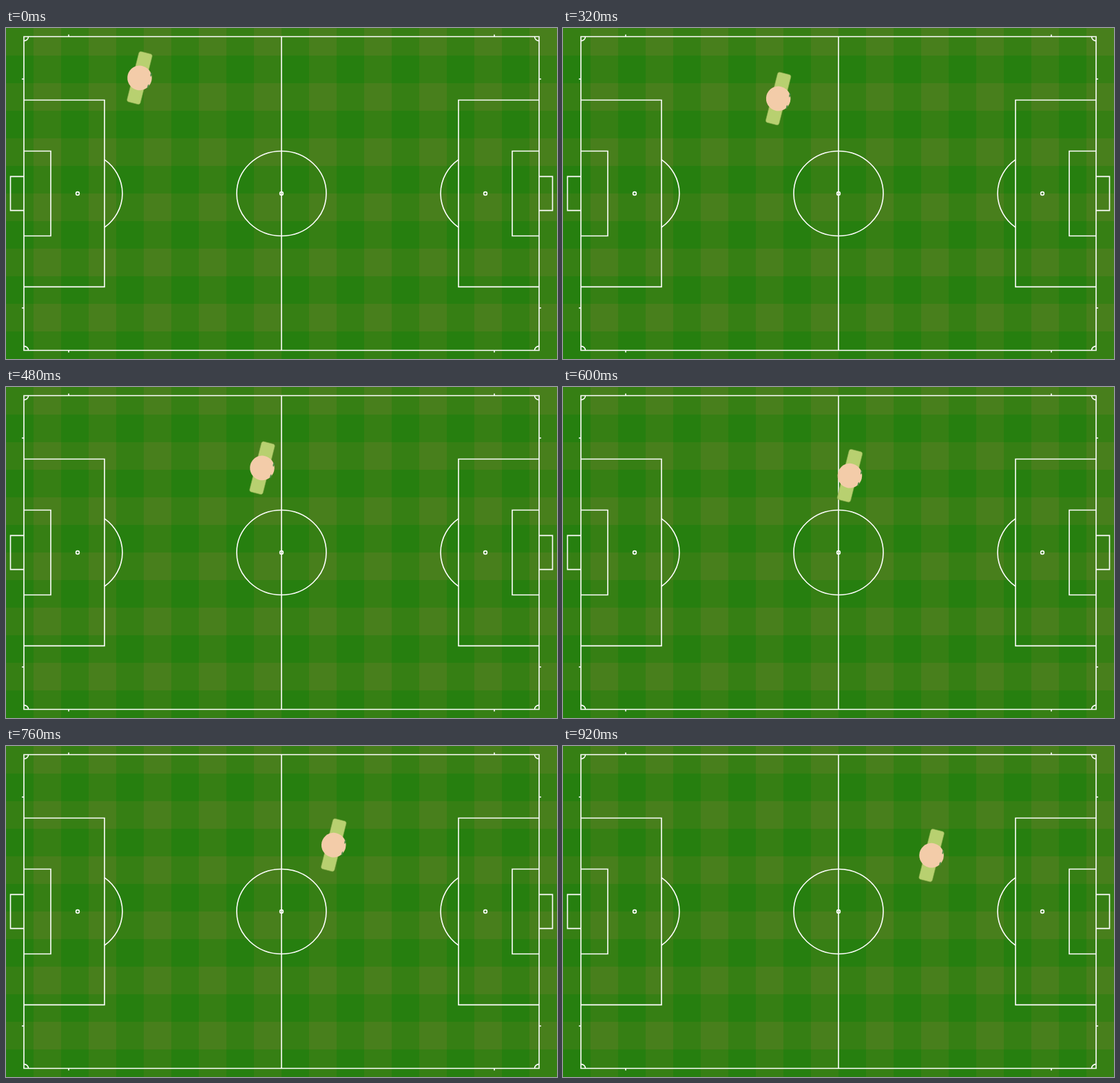
These frames come from a looping animation (800 px wide and 480 px high, 0.96 s). An HTML page:

```html
<!DOCTYPE html>
<html lang="en">
<head>
<meta charset="utf-8">
<title>Pitch</title>
<style>
  html, body { margin: 0; width: 100%; height: 100%; overflow: hidden; background: #367f14; }
  svg { display: block; width: 800px; height: 480px; }
</style>
</head>
<body>
<svg viewBox="0 0 800 480">
  <defs>
    <pattern id="grass" width="80" height="80" patternUnits="userSpaceOnUse">
      <rect width="80" height="80" fill="#367f14"/>
      <rect x="40" width="40" height="40" fill="#487f1c"/>
      <rect y="40" width="40" height="40" fill="#267f0f"/>
    </pattern>
    <g id="half">
      <path d="M400 12.5H26V467.5H400"/>
      <path d="M26 104.5H143V375.4H26M26 178.5H65V301.5H26M26 215.4H6.5V264.6H26"/>
      <path d="M143 190.8A65 61.5 0 0 1 143 289.2"/>
      <path d="M32.5 12.5A6.5 6.15 0 0 1 26 18.65M26 461.35A6.5 6.15 0 0 1 32.5 467.5"/>
      <path d="M91 12.5V9.5M91 467.5V470.5M26 74H23M26 406H23"/>
      <circle cx="104" cy="240" r="2.4"/>
    </g>
  </defs>
  <rect width="800" height="480" fill="url(#grass)"/>
  <g fill="none" stroke="#fff" stroke-width="1.6">
    <use href="#half"/>
    <use href="#half" transform="matrix(-1 0 0 1 800 0)"/>
    <path d="M400 12.5V467.5"/>
    <ellipse cx="400" cy="240" rx="65" ry="61.5"/>
    <circle cx="400" cy="240" r="2.4"/>
  </g>
  <g id="player">
    <rect x="-10" y="-37.7" width="20" height="75.4" rx="3.5" fill="#b8d070" stroke="#7fa545" stroke-width=".6"/>
    <circle r="17.8" fill="#f3cca9"/>
    <g fill="#4b8a45">
      <ellipse cx="15" cy="-8.8" rx="1" ry="3"/>
      <ellipse cx="15" cy="8.8" rx="1" ry="3"/>
    </g>
  </g>
</svg>
<script>
  const LOOP = 960, STEP = 40;
  const start = { x: 194, y: 72.4 }, move = { x: 14.83, y: 3.75 };
  const heading = Math.atan2(move.y, move.x) * 180 / Math.PI;
  const player = document.getElementById('player');

  function draw(ms) {
    const n = Math.floor((ms % LOOP) / STEP);
    const x = start.x + move.x * n;
    const y = start.y + move.y * n;
    player.setAttribute('transform', `translate(${x} ${y}) rotate(${heading})`);
  }

  let origin;
  function tick(now) {
    origin ??= now;
    draw(now - origin);
    requestAnimationFrame(tick);
  }
  draw(0);
  requestAnimationFrame(tick);
</script>
</body>
</html>
```
